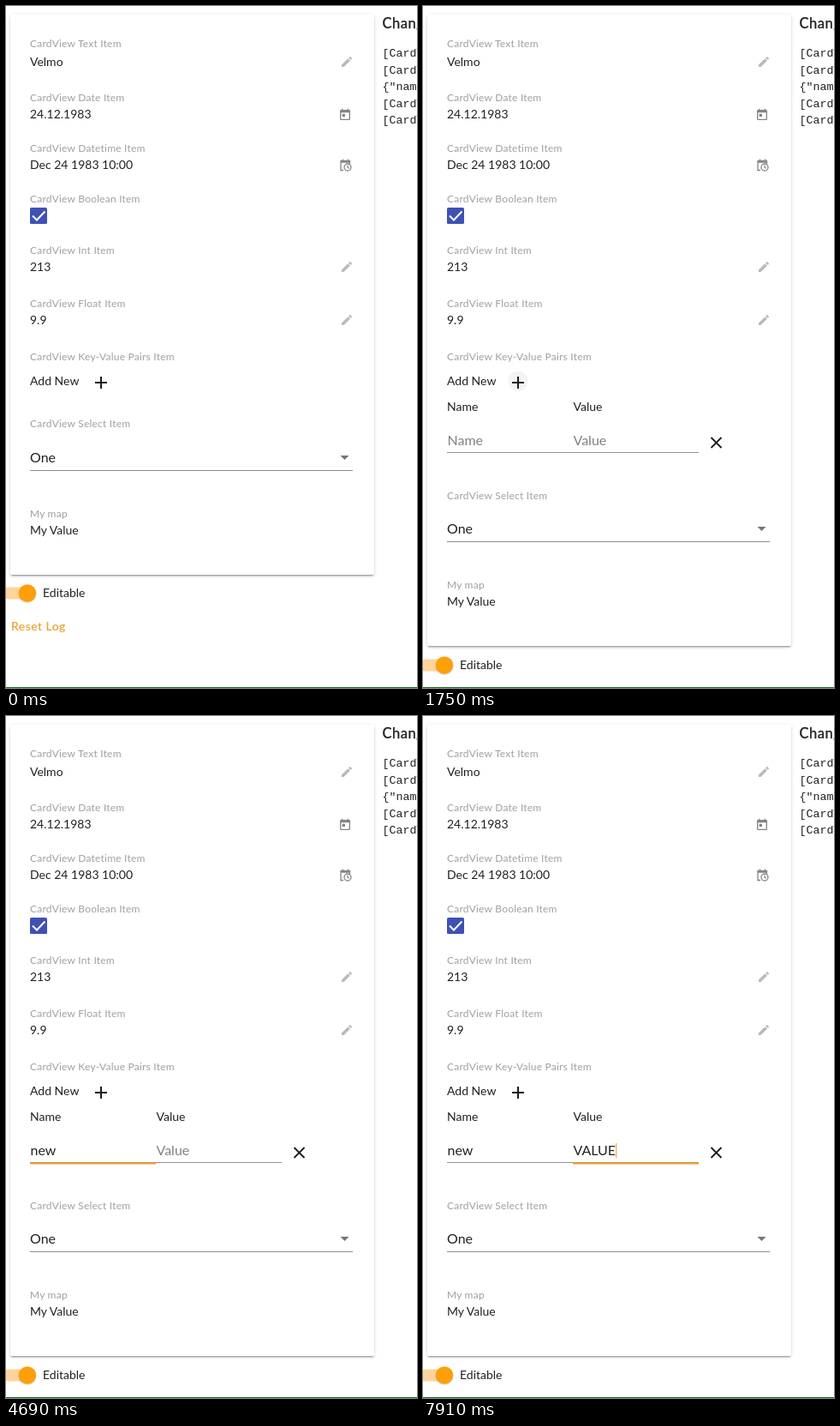
Animation of 480 by 795 pixels, one loop 8000 ms. Source, as an HTML page:

```html
<!DOCTYPE html>
<html lang="en">
<head>
<meta charset="utf-8">
<title>Card view</title>
<style>
  html, body { margin: 0; width: 100%; height: 100%; overflow: hidden; background: #fff; }
  svg { display: block; position: absolute; left: 0; top: 0; }
  text { font-family: Lato, "Open Sans", sans-serif; fill: #212121; white-space: pre; }
  .label { font-size: 12px; letter-spacing: .018em; fill: #a0a0a0; }
  .value { font-size: 14px; }
  .input { font-size: 16px; }
  .title { font-size: 16.5px; font-weight: 500; letter-spacing: .03em; stroke: #212121; stroke-width: .25px; }
  .mono { font: 13.33px "Liberation Mono", monospace; }
  .option { font: bold 16px "Liberation Sans", sans-serif; fill: #000; }
  .heart { font-family: "DejaVu Sans", sans-serif; }
  .reset { font-size: 14px; font-weight: 600; letter-spacing: .03em; fill: #eea236; }
  .hint { fill: #808080; }
  .hint.on { fill: #efa02f; stroke: #efa02f; stroke-width: .3px; }
  #card {
    position: absolute; left: 5px; top: 10px; width: 425px; height: 653px;
    background: #fff; border-radius: 2px;
    box-shadow: 0 3px 1px -2px rgba(0,0,0,.2), 0 2px 2px rgba(0,0,0,.14), 0 1px 5px rgba(0,0,0,.12);
  }
  #popup rect { filter: drop-shadow(0 4px 5px rgba(0,0,0,.28)); }
</style>
</head>
<body>
<div id="card"></div>
<svg width="480" height="795" viewBox="0 0 480 795">
  <defs>
    <path id="pencil" fill="#b9b9b9" transform="scale(.667)" d="M3 17.25V21h3.75L17.81 9.94l-3.75-3.75zM20.71 7.04a1 1 0 0 0 0-1.41l-2.34-2.34a1 1 0 0 0-1.41 0l-1.83 1.83 3.75 3.75z"/>
    <path id="calendar" fill="#858585" fill-rule="evenodd" transform="scale(.667)" d="M19 3h-1V1h-2v2H8V1H6v2H5a2 2 0 0 0-2 2v14a2 2 0 0 0 2 2h14a2 2 0 0 0 2-2V5a2 2 0 0 0-2-2zm0 16H5V8h14zM7 10h5v5H7z"/>
  </defs>

  <g id="fields"></g>
  <use href="#pencil" x="390" y="57"/>
  <use href="#calendar" x="388" y="119"/>
  <g fill="none" stroke="#858585" stroke-width="1.3">
    <path d="M394 191.5h-3v-11h10.500v4M391 182h10.500M393.500 180.500v-2M399.500 180.500v-2"/>
    <circle cx="399" cy="188" r="4"/>
    <path d="M399 185.800v2.400l1.800 1"/>
  </g>
  <use href="#pencil" x="390" y="296"/>
  <use href="#pencil" x="390" y="358"/>

  <rect x="28" y="235" width="20" height="19" rx="1.500" fill="#3f51b5"/>
  <path d="M31 244.500l5 5 9.500-10" fill="none" stroke="#fff" stroke-width="2"/>

  <circle id="ripple" cx="111" cy="437" r="11.500" fill="#e6e6e6"/>
  <path d="M104 439h14M111 432v14" stroke="#1c1c1c" stroke-width="2"/>

  <g id="row">
    <text class="value" x="28" y="471.500">Name</text>
    <text class="value" x="175.500" y="471.500">Value</text>
    <path d="M28 520.500H322" stroke="#949494"/>
    <g id="inputs"></g>
    <path d="M336.500 503l12 12M348.500 503l-12 12" stroke="#1c1c1c" stroke-width="1.900"/>
  </g>

  <text id="selectLabel" class="label" x="28" y="491">CardView Select Item</text>
  <g id="lower">
    <text class="input" x="28" y="531.500">One</text>
    <path d="M390.500 524h10l-5 5z" fill="#757575"/>
    <path d="M28 541.500H405" stroke="#8c8c8c"/>
    <text class="label" x="28" y="596">My map</text>
    <text class="value" x="28" y="615.500">My Value</text>
  </g>

  <g id="footer">
    <rect x="-4" y="677.500" width="36" height="14" rx="7" fill="#fdd49b"/>
    <circle cx="25" cy="685.500" r="10.500" fill="#000" opacity=".12"/>
    <circle cx="25" cy="684.500" r="10.300" fill="#fe9f0c"/>
    <text class="value" x="43" y="689">Editable</text>
    <text class="reset" x="6" y="728">Reset Log</text>
  </g>

  <g id="popup">
    <rect x="28.500" y="516" width="150" height="62.500" fill="#fff" stroke="#b0b0b0"/>
    <text class="option" x="41" y="539">wanm</text>
    <text class="option" x="41" y="568">I <tspan class="heart">♥</tspan> ADF</text>
  </g>

  <text class="title" x="439.500" y="26">Changelog</text>
  <g id="log"></g>
  <path d="M0 794.500H480" stroke="#17691b"/>
</svg>

<script>
const LOOP = 8000;
const ROW_ADDED = 1680;
const $ = id => document.getElementById(id);
const clamp = v => Math.min(1, Math.max(0, v));
const ramp = (t, start, length) => clamp((t - start) / length);
const between = (t, start, end) => t >= start && t < end;
const easeOut = v => 1 - (1 - v) ** 3;

function add(parent, tag, attrs, content = "") {
  const node = document.createElementNS("http://www.w3.org/2000/svg", tag);
  for (const key in attrs) node.setAttribute(key, attrs[key]);
  node.textContent = content;
  return parent.appendChild(node);
}

// label, its baseline, value, its baseline
[
  ["Text", 48, "Velmo", 70],
  ["Date", 111, "24.12.1983", 131],
  ["Datetime", 170, "Dec 24 1983 10:00", 189.5],
  ["Boolean", 229, "", 0],
  ["Int", 289, "213", 309],
  ["Float", 351, "9.9", 371],
  ["Key-Value Pairs", 413, "Add New", 442]
].forEach(([kind, labelY, value, valueY]) => {
  add($("fields"), "text", { class: "label", x: 28, y: labelY }, `CardView ${kind} Item`);
  if (value) add($("fields"), "text", { class: "value", x: 28, y: valueY }, value);
});

["[CardView", "[CardView", '{"name":', "[CardView", "[CardView"].forEach((line, i) =>
  add($("log"), "text", { class: "mono", x: 439.5, y: 59 + i * 19.5 }, line));

const inputs = [
  { x: 28, hint: "Name", focus: 3290, blur: 5320, text: "new",
    keys: [3850, 3990, 4200], caretOn: [[3850, 4690], [5180, 5320]] },
  { x: 175, hint: "Value", focus: 5320, blur: Infinity, text: "VALUE",
    keys: [5810, 6020, 6300, 6440, 6580], caretOn: [[5810, 7140], [7630, LOOP]] }
];

for (const input of inputs) {
  input.label = add($("inputs"), "text", { x: input.x + .5, y: 512 });
  input.bar = add($("inputs"), "rect", { y: 520.5, height: 2, fill: "#f59e20" });
  input.caret = add($("inputs"), "rect", { y: 498, width: 1.2, height: 17, fill: "#f2ab4c" });
}

function drawInput(input, t) {
  const { x, label, bar, caret } = input;
  const typed = input.text.slice(0, input.keys.filter(key => t >= key).length);
  const focused = between(t, input.focus, input.blur);
  label.textContent = typed || input.hint;
  label.setAttribute("class", "input" + (typed ? "" : focused ? " hint on" : " hint"));

  const grown = easeOut(ramp(t, input.focus, 300));
  const width = 147 * (.5 + grown / 2);
  bar.setAttribute("x", x + (147 - width) / 2);
  bar.setAttribute("width", width);
  bar.setAttribute("opacity", grown * (1 - ramp(t, input.blur, 200)));

  const lit = typed && input.caretOn.some(([start, end]) => between(t, start, end));
  caret.setAttribute("opacity", lit ? 1 : 0);
  if (lit) caret.setAttribute("x", x + .5 + label.getComputedTextLength());
}

function draw(t) {
  const open = t >= ROW_ADDED;
  const shift = (id, y) => $(id).setAttribute("transform", `translate(0 ${open ? y : 0})`);
  shift("selectLabel", 84);
  shift("lower", 83);
  shift("footer", 84);
  $("card").style.height = (open ? 736 : 653) + "px";
  $("row").style.display = open ? "" : "none";
  $("ripple").setAttribute("opacity", ramp(t, 1400, 140) * (1 - ramp(t, 1680, 140)));
  $("popup").setAttribute("opacity", t < 3570 ? 0 : 1 - ramp(t, 3850, 140));
  inputs.forEach(input => drawInput(input, t));
}

const start = performance.now();
function tick() {
  draw((performance.now() - start) % LOOP);
  requestAnimationFrame(tick);
}
tick();
</script>
</body>
</html>
```
